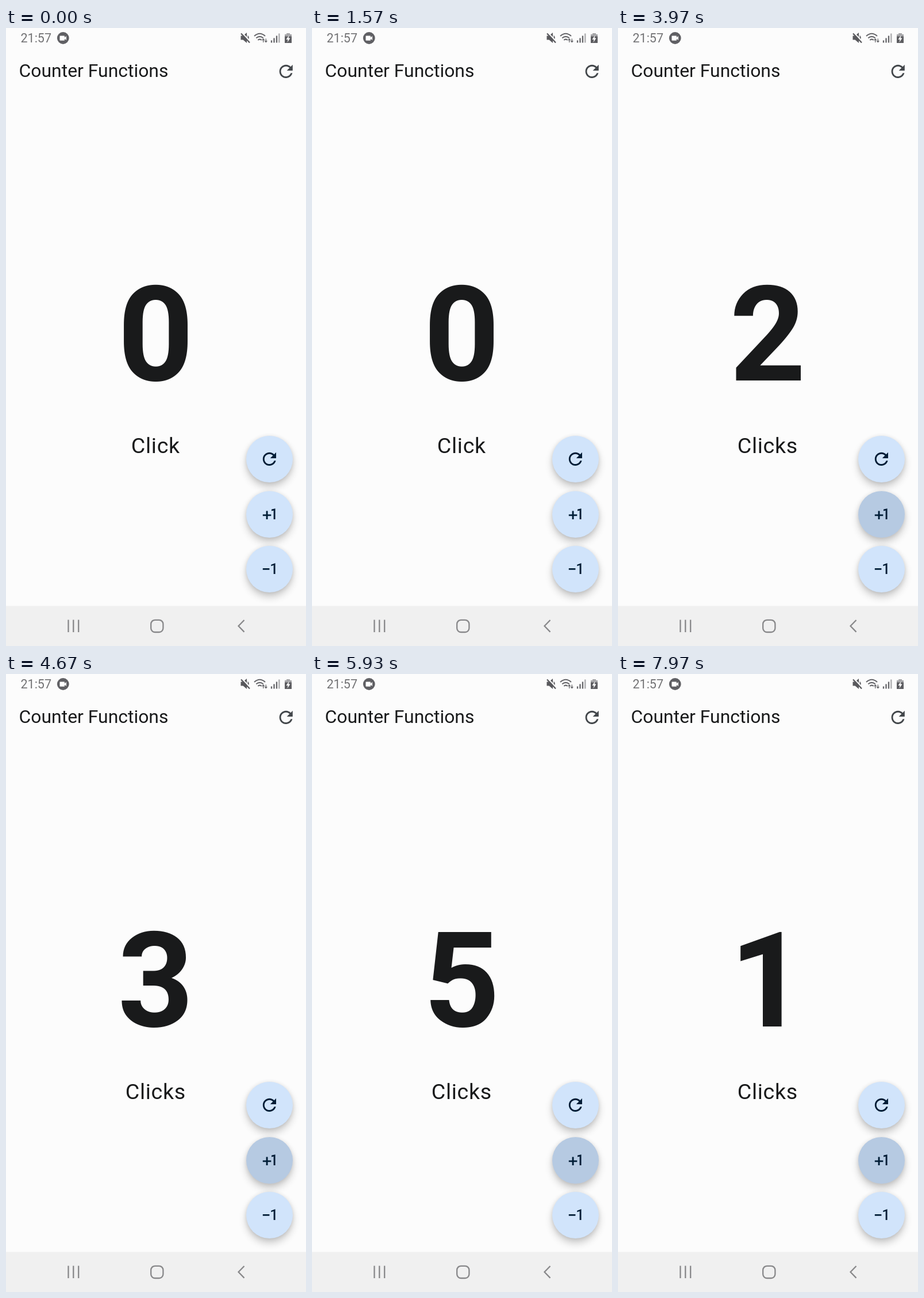
An HTML page for the animation above (8 s loop, 522 by 1073 pixels).

```html
<!DOCTYPE html>
<html lang="en">
<head>
<meta charset="utf-8">
<title>Counter Functions</title>
<style>
  html, body { margin: 0; width: 100%; height: 100%; overflow: hidden; background: #fcfcfc; }
  #stage { position: absolute; left: 0; top: 0; width: 522px; height: 1073px; overflow: hidden; }
  #stage > svg { position: absolute; left: 0; top: 0; }
  text { font-family: Roboto, sans-serif; fill: #191a1b; }
  .fab {
    position: absolute; left: 417.6px; width: 81.2px; height: 81.2px; border-radius: 50%;
    background: #d1e4fb;
    box-shadow: 0 8px 14px rgba(0,0,0,.2), 0 1px 7px rgba(0,0,0,.1);
  }
  .ink, .fab svg { position: absolute; }
  .ink { inset: 0; border-radius: 50%; background: #001d36; opacity: 0; }
  .fab svg { left: 23.2px; top: 23.2px; width: 34.8px; height: 34.8px; fill: #001d36; }
</style>
</head>
<body>
<div id="stage">
  <svg width="522" height="1073" viewBox="0 0 522 1073">
    <defs>
      <path id="refresh" d="M17.65 6.35C16.2 4.9 14.21 4 12 4c-4.42 0-7.99 3.58-7.99 8s3.57 8 7.99 8c3.73 0 6.84-2.55 7.73-6h-2.08c-.82 2.33-3.04 4-5.65 4-3.31 0-6-2.69-6-6s2.69-6 6-6c1.66 0 3.14.69 4.22 1.78L13 11h7V4z"/>
      <path id="plus" d="M10 8H8v4H4v2h4v4h2v-4h4v-2h-4zm4.5-1.92V7.9l2.5-.5V18h2V5z"/>
      <path id="minus" d="M4 11v2h8v-2H4zm15 7h-2V7.38L14 8.4V6.7L18.7 5h.3v13z"/>
    </defs>

    <!-- status bar -->
    <text x="25.500" y="25" font-size="21.500" style="fill:#737375">21:57</text>
    <circle cx="99.300" cy="17.500" r="10.400" fill="#606064"/>
    <path d="M94.500 13.500h6.500q1 0 1 1v2l3-2.400v7l-3-2.400v2q0 1-1 1h-6.500q-1 0-1-1v-6.200q0-1 1-1z" fill="#fff"/>
    <g fill="#59595d">
      <path d="M408.500 13.500h4l6.500-5.500v18l-6.500-5.500h-4z"/>
      <path d="M420.500 12.500q4.500 4.500 0 9z"/>
      <path d="M410.500 8l15 16" stroke="#fcfcfc" stroke-width="2"/>
      <path d="M409 9.500l15 16" stroke="#59595d" stroke-width="2.200"/>
    </g>
    <g fill="none" stroke="#656569" stroke-width="2">
      <path d="M432 14q9.500-8.500 19 0M435.300 17.600q6.200-5.400 12.400 0M438.300 21q3.200-2.800 6.400 0"/>
      <path d="M447.700 25v-6m-2 2.200l2-2.200 2 2.200M452.300 18.500v6m-2-2.200l2 2.200 2-2.200" stroke-width="1.300"/>
      <path d="M462 25.500v-4M466.500 25.500v-8M471 25.500v-12" stroke-width="2.300"/>
      <path d="M475.300 25.500v-16" stroke="#aaaaad" stroke-width="2.300"/>
    </g>
    <path d="M488.500 9h5v2h3.500v15h-12v-15h3.500z" fill="#5d5d61"/>
    <path d="M488.500 9h5v2h3.500v3.500h-12v-3.500h3.500z" fill="#a5a5a8"/>
    <path d="M492.500 12.500l-5 7.500h3l-1 5 5-7.500h-3z" fill="#fff"/>

    <!-- app bar -->
    <text x="22.600" y="85.200" font-size="31.900">Counter Functions</text>
    <use href="#refresh" transform="translate(469.800 58) scale(1.450)" fill="#43474b"/>

    <!-- counter -->
    <g text-anchor="middle">
      <text id="count" x="260.400" y="612.300" font-size="231" font-weight="700">0</text>
      <text id="label" x="260.300" y="737.800" font-size="37.700" letter-spacing=".650">Click</text>
    </g>

    <!-- navigation bar -->
    <path d="M0 1003.600h522v70h-522z" fill="#f0f0f0"/>
    <g fill="none" stroke="#88888a" stroke-width="2.300">
      <path d="M108.500 1027.500v21.500M117.300 1027.500v21.500M126.200 1027.500v21.500"/>
      <rect x="252.200" y="1027.800" width="21.200" height="21.200" rx="7"/>
      <path d="M414.500 1028l-10 10.300 10 10.300"/>
    </g>
  </svg>
</div>
<script>
const LOOP = 8000, TAP = 90, HOLD = 350, FADE = 200;
const stage = document.getElementById('stage');
const count = document.getElementById('count');
const label = document.getElementById('label');

// touch-down time, button, value once released
const presses = [
  [2450, 'plus', 1], [3820, 'plus', 2], [4480, 'plus', 3], [5130, 'plus', 4],
  [5760, 'plus', 5], [6680, 'refresh', 0], [7790, 'plus', 1]
];

const inks = {};
['refresh', 'plus', 'minus'].forEach((name, i) => {
  const fab = document.createElement('div');
  fab.className = 'fab';
  fab.style.top = 707.8 + i * 95.7 + 'px';
  fab.innerHTML = `<div class="ink"></div><svg viewBox="0 0 24 24"><use href="#${name}"/></svg>`;
  stage.append(fab);
  inks[name] = fab.firstChild;
});

const clamp = v => Math.max(0, Math.min(1, v));
const easeOut = v => 1 - (1 - v) ** 3;

function draw(now) {
  const t = now % LOOP;
  let value = 0;
  for (const name in inks) inks[name].style.opacity = 0;
  for (const [at, name, next] of presses) {
    const age = t - at;
    if (age >= TAP) value = next;
    if (age < 0 || age > HOLD + FADE) continue;
    const alpha = clamp(age / 75) * (1 - clamp((age - HOLD) / FADE));
    inks[name].style.opacity = 0.13 * alpha;
    inks[name].style.transform = `scale(${0.3 + 0.7 * easeOut(clamp(age / 160))})`;
  }
  count.textContent = value;
  label.textContent = value ? 'Clicks' : 'Click';
}

function tick() {
  draw(performance.now());
  requestAnimationFrame(tick);
}
tick();
</script>
</body>
</html>
```
